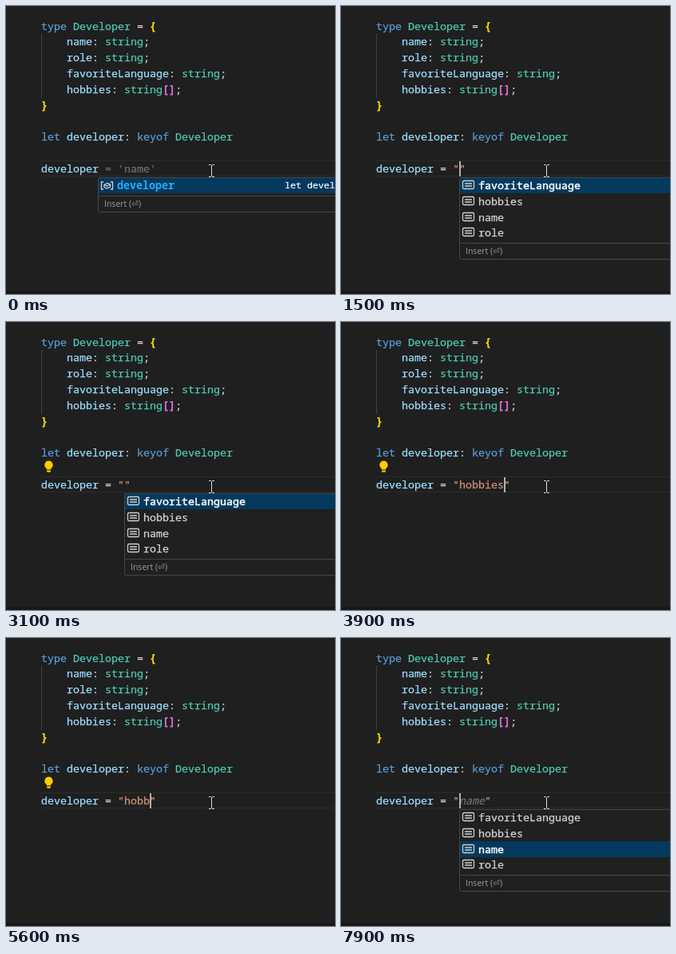
An HTML page that plays this animation: 412x360 px, repeating every 8000 ms.

```html
<!DOCTYPE html>
<html lang="en">
<head>
<meta charset="utf-8">
<title>Typed key completion</title>
<style>
  html, body { margin: 0; width: 100%; height: 100%; overflow: hidden; background: #1f1f1f; }
  svg { display: block; }
  text { font: 13.333px "Noto Sans Mono", "DejaVu Sans Mono", monospace; white-space: pre; color: #d4d4d4; }
  text, tspan { fill: currentColor; stroke: currentColor; stroke-width: .25; }
  .key { color: #569cd6; }
  .type { color: #4ec9b0; }
  .var { color: #9cdcfe; }
  .brace { color: #ffd700; font-weight: bold; }
  .bracket { color: #da70d6; font-weight: bold; }
  .str { color: #ce9178; }
  .ghost { color: #6e6e6e; }
  .slant { font-style: italic; }
  .match { color: #2aaaff; font-weight: bold; stroke: none; }
  .picked { color: #fff; stroke-width: .45; }
  .detail { font-size: 11.667px; stroke-width: .2; }
  .hint { font: 10.5px "Open Sans", "Noto Sans", sans-serif; color: #9d9d9d; stroke: none; }
  .icon { fill: none; stroke: #d0d0d0; stroke-width: 1.3; }
</style>
</head>
<body>
<svg width="412" height="360" viewBox="0 0 412 360">
  <rect width="412" height="360" fill="#1f1f1f"/>
  <path d="M0 356h412v4H0z" fill="#181818"/>
  <path d="M44.5 35v80" stroke="#404040"/>
  <path d="M412 193.5H44V212.5H412" fill="none" stroke="#2b2b2b"/>
  <g id="code"></g>
  <g id="live"></g>
  <path id="bulb" d="M53.5 173.5a5.2 5.2 0 0 0-2.7 9.6v1.4h5.4v-1.4a5.2 5.2 0 0 0-2.7-9.6zM51 185.5h5v1.2l-1 1h-3l-1-1z" fill="#ffcc00"/>
  <path d="M254 198.5h2.5l1 1 1-1H261M257.5 199v14M254 213.5h2.5l1-1 1 1H261" fill="none" stroke="#ddd"/>
</svg>
<script>
const LOOP = 8000, CHAR = 8, LEFT = 44, ROW = 19.8;
const KEYS = ['favoriteLanguage', 'hobbies', 'name', 'role'];
const $ = id => document.getElementById(id);
const span = (cls, s) => `<tspan class="${cls}">${s}</tspan>`;
const text = (x, y, s, cls = '') => `<text x="${x}" y="${y}" class="${cls}">${s}</text>`;
const rect = (x, y, w, h, fill, extra = '') =>
  `<rect x="${x}" y="${y}" width="${w}" height="${h}" fill="${fill}" ${extra}/>`;
const line = (i, s) => text(LEFT, Math.round(29.6 + ROW * i), s);
const field = (name, tail = '') => `    ${span('var', name)}: ${span('type', 'string')}${tail};`;

$('code').innerHTML = [
  `${span('key', 'type')} ${span('type', 'Developer')} = ${span('brace', '{')}`,
  field('name'), field('role'), field('favoriteLanguage'),
  field('hobbies', span('bracket', '[]')),
  span('brace', '}'), '',
  `${span('key', 'let')} ${span('var', 'developer')}: ${span('key', 'keyof')} ${span('type', 'Developer')}`
].map((s, i) => line(i, s)).join('');

// [time, typed after "developer", menu]: menu is 'var' or the picked key's index
const steps = [
  [0, '', 'var'], [600, ' '], [900, ' ='], [1100, ' = '],
  [1400, ' = "', 0], [2100, ' = "', 1], [2400, ' = "', 2],
  [2900, ' = "', 3], [3000, ' = "', 0], [3500, ' = "', 1],
  [3900, ' = "hobbies'], [4600, ' = "hobbie'], [5000, ' = "hobbi'], [5400, ' = "hobb'],
  [5800, ' = "hob'], [6200, ' = "ho'], [6500, ' = "h'], [6800, ' = "'], [7200, ' = '],
  [7500, ' = "', 0], [7700, ' = "', 1], [7800, ' = "', 2]
];

function editor(typed, menu) {
  const [op, word] = typed.split('"');
  let s = span('var', 'developer') + op;
  if (word === undefined) s += span('ghost', " = 'name'".slice(op.length));
  else s += span('str', '"' + word) + (menu === 2 ? span('ghost slant', 'name') : '') + span('str', '"');
  return line(9, s);
}

// Popup box with its highlighted row, outline and status line
function popup(x, height, picked) {
  return rect(x, 214, 420, height, '#202020') +
    rect(x + 1, Math.round(214.4 + ROW * picked), 420, 20, '#04395e') +
    rect(x + .5, 214.5, 420, height, 'none', 'stroke="#454545" rx="2"') +
    `<path d="M${x + 1} ${height + 194.5}H412" stroke="#454545"/>` +
    text(x + 8, height + 208, 'Insert (⏎)', 'hint');
}

function variableMenu() {
  return popup(115, 43, 0) +
    `<path class="icon" d="M122 220h-2.5v9h2.5M131 220h2.5v9H131"/>
     <path class="icon" d="M123 223.5l4-2 3.5 1.5v3l-4 2-3.5-1.5zl3.5 1.5 4-2"/>` +
    text(139, 229, 'developer', 'match') +
    text(349, 228, 'let developer', 'detail picked');
}

function keyMenu(picked) {
  return popup(148, 102, picked) + KEYS.map((key, i) => {
    const y = Math.round(229 + ROW * i);
    return `<path class="icon" d="M154 ${y - 10.5}h11q1.5 0 1.5 1.5v7q0 1.5-1.5 1.5h-11q-1.5 0-1.5-1.5v-7q0-1.5 1.5-1.5zM155 ${y - 7}h9M155 ${y - 4}h9"/>` +
      text(172, y, key, i === picked ? 'picked' : '');
  }).join('');
}

// The caret's blink restarts whenever the typed text changes
function lastEdit(i) {
  while (i > 0 && steps[i - 1][1] === steps[i][1]) i--;
  return i ? steps[i][0] : -600;
}

let shown;
function draw() {
  const t = performance.now() % LOOP;
  const now = steps.findLastIndex(s => s[0] <= t);
  const [, typed, menu] = steps[now];
  const caretOn = (t - lastEdit(now)) % 1000 < 500;
  const state = now + ':' + caretOn;
  if (state !== shown) {
    shown = state;
    const x = LEFT + CHAR * (9 + typed.length);
    $('live').innerHTML = editor(typed, menu) +
      (menu === 'var' ? variableMenu() : menu >= 0 ? keyMenu(menu) : '') +
      (caretOn ? rect(x, 194, 2, 19, '#aeafad') : '');
  }
  $('bulb').style.display = t >= 2300 && t < 6000 ? '' : 'none';
  requestAnimationFrame(draw);
}
draw();
</script>
</body>
</html>
```
